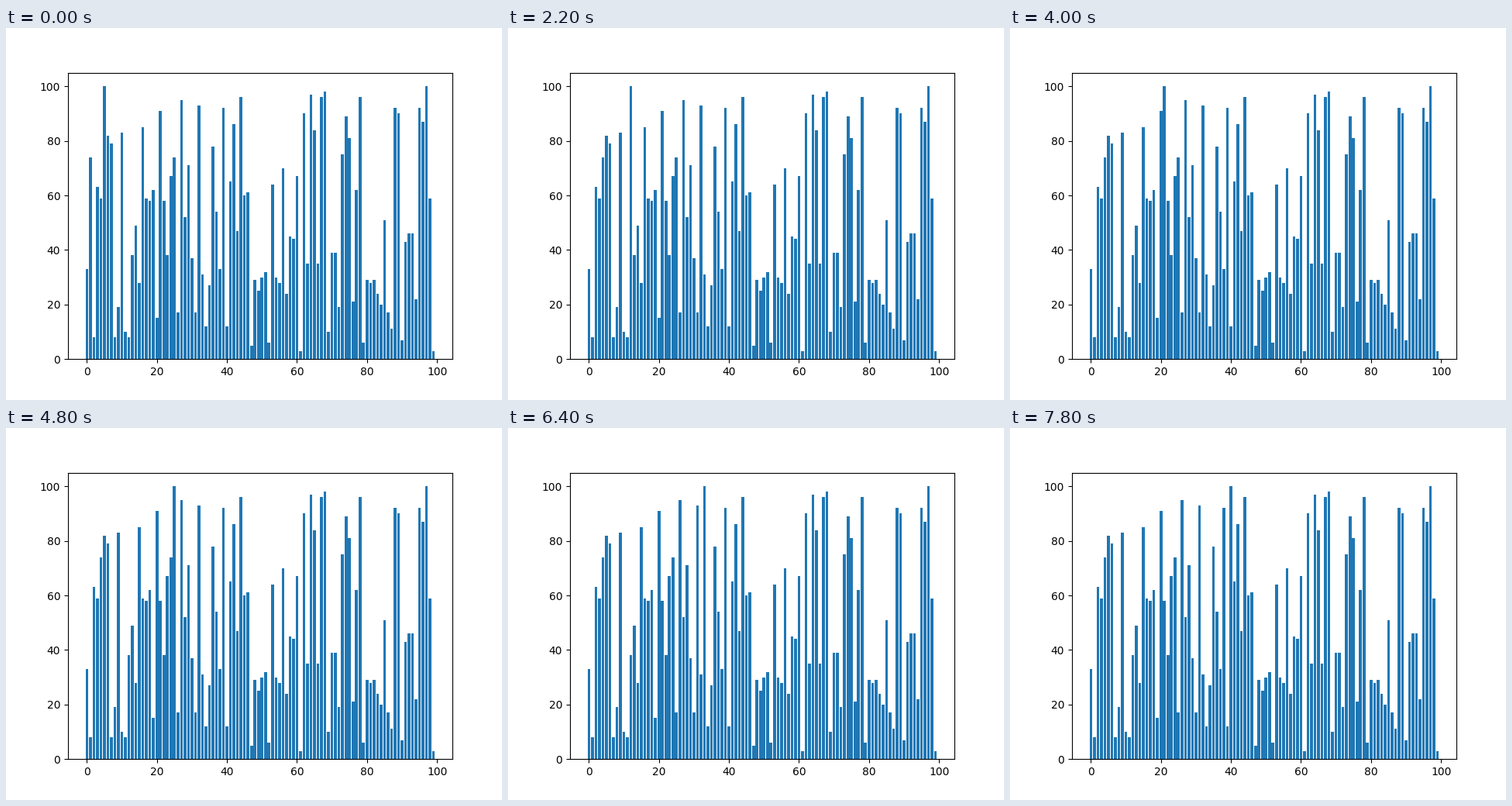
Write a matplotlib script that moves like this. It is 640 by 480 pixels and loops after 8 s.

```python
import matplotlib.pyplot as plt
from matplotlib.animation import FuncAnimation

FRAMES = 40
INTERVAL = 200

START = [
    33, 74, 8, 63, 59, 100, 82, 79, 8, 19,
    83, 10, 8, 38, 49, 28, 85, 59, 58, 62,
    15, 91, 58, 38, 67, 74, 17, 95, 52, 71,
    37, 17, 93, 31, 12, 27, 78, 54, 33, 92,
    12, 65, 86, 47, 96, 60, 61, 5, 29, 25,
    30, 32, 6, 64, 30, 28, 70, 24, 45, 44,
    67, 3, 90, 35, 97, 84, 35, 96, 98, 10,
    39, 39, 19, 75, 89, 81, 21, 62, 96, 6,
    29, 28, 29, 24, 20, 51, 17, 11, 92, 90,
    7, 43, 46, 46, 22, 92, 87, 100, 59, 3,
]


def bubble(values, steps):
    """Return the values after the first comparisons of a bubble sort pass."""
    out = list(values)
    for i in range(steps):
        if out[i] > out[i + 1]:
            out[i], out[i + 1] = out[i + 1], out[i]
    return out


fig, ax = plt.subplots(figsize=(6.4, 4.8), dpi=100)
bars = ax.bar(range(len(START)), START)


def update(frame):
    for bar, height in zip(bars, bubble(START, frame + 1)):
        bar.set_height(height)
    return list(bars)


anim = FuncAnimation(fig, update, frames=FRAMES, interval=INTERVAL,
                     repeat=True, repeat_delay=0)
plt.show()
```
